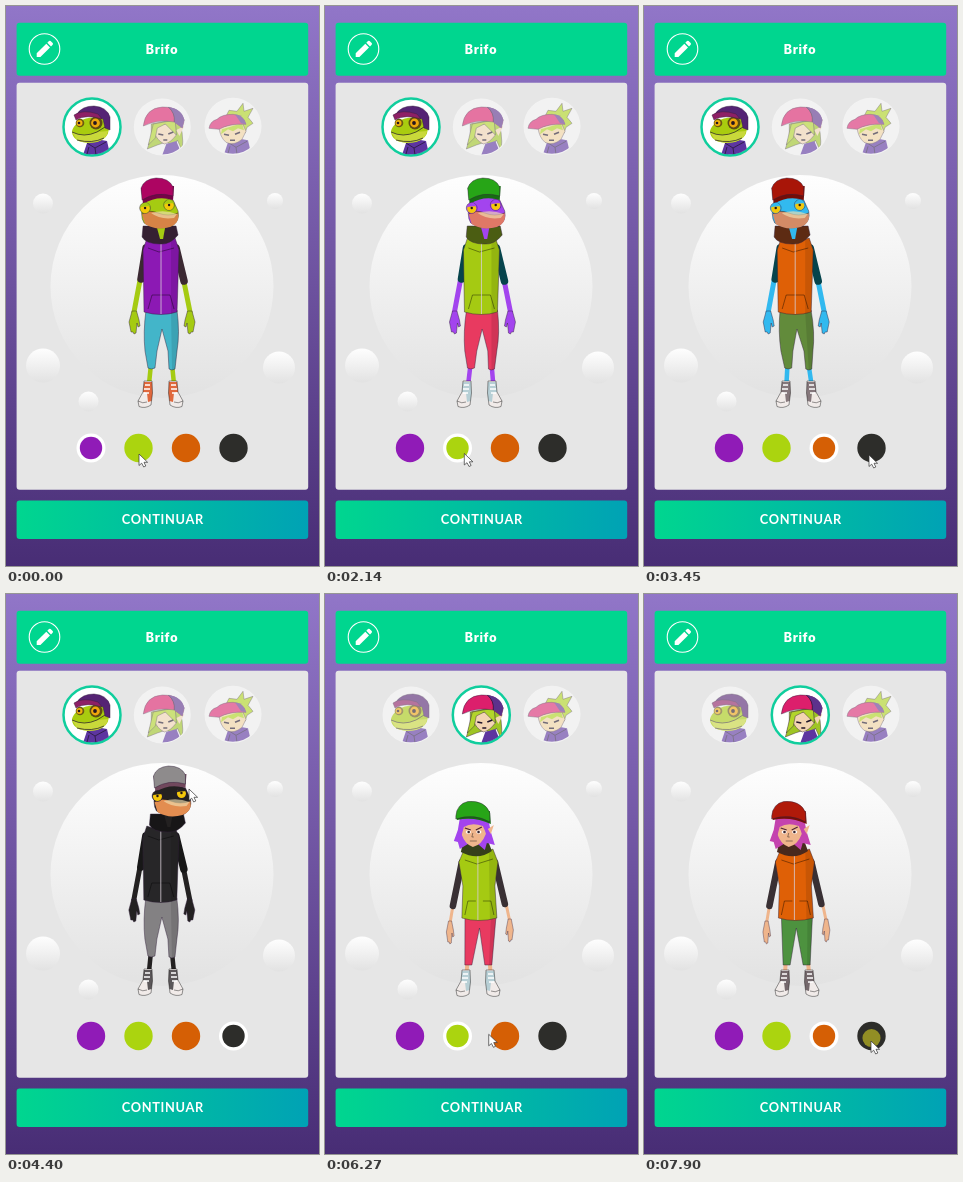
These frames come from a looping animation (313 px wide and 560 px high, 7.99 s). An HTML page:

```html
<!DOCTYPE html>
<html lang="es">
<head>
<meta charset="utf-8">
<title>Avatar</title>
<style>
html, body { margin: 0; width: 100%; height: 100%; overflow: hidden; background: #6b4d9f; }
svg { display: block; width: 100vw; height: 100vh; }
text { fill: #fff; text-anchor: middle; }
.hat { fill: var(--hat); } .band { fill: var(--band); }
.skin { fill: var(--skin); } .mouth { fill: var(--mouth); }
.vest { fill: var(--vest); } .scarf { fill: var(--scarf); }
.pants { fill: var(--pants); } .shoe { fill: var(--shoe); } .hair { fill: var(--hair); }
.sleeve, .limb { fill: none; stroke-linecap: round; stroke-linejoin: round; }
.sleeve { stroke: var(--sleeve); } .limb { stroke: var(--skin); }
.line { fill: none; stroke: #20152a; stroke-width: .7; }
.inked { stroke: #33203c; stroke-width: .6; stroke-opacity: .75; }
.seam { fill: none; stroke: #000; stroke-opacity: .5; stroke-width: .8; }
.zip { fill: none; stroke: #d8ced8; stroke-opacity: .8; stroke-width: 1; }
.shade { fill: #000; fill-opacity: .1; }
</style>
</head>
<body>
<svg viewBox="0 0 313 560" preserveAspectRatio="none">
  <defs>
    <linearGradient id="sky" x2="0" y2="1"><stop stop-color="#9176c8"/><stop offset="1" stop-color="#482d75"/></linearGradient>
    <linearGradient id="orb" x2="0" y2="1"><stop stop-color="#fefefe"/><stop offset="1" stop-color="#e2e2e2"/></linearGradient>
    <linearGradient id="cta"><stop stop-color="#00d68f"/><stop offset="1" stop-color="#00a2b5"/></linearGradient>
    <clipPath id="disc"><circle r="27.5"/></clipPath>
  </defs>
  <rect width="313" height="560" fill="url(#sky)"/>
  <rect x="10.600" y="16.700" width="291.600" height="53" rx="3" fill="#00d68f"/>
  <circle cx="38.500" cy="43" r="15.300" fill="none" stroke="#fff" stroke-width="1.100"/>
  <path d="M30.700 47.300 L40.300 37.700 L44 41.400 L34.400 51 H30.700Z M41.300 36.700 L43 35 Q43.800 34.400 44.600 35 L46.700 37.100 Q47.300 37.900 46.700 38.700 L45 40.400Z" fill="#fff"/>
  <text x="156" y="47.500" font-family="Inter, sans-serif" font-weight="800" font-size="12.500" letter-spacing=".5">Brifo</text>
  <rect x="10.600" y="76.800" width="291.600" height="407" rx="3" fill="#e6e6e6"/>
  <g id="orbs" fill="url(#orb)"></g>
  <g id="avatars"></g>
  <g id="frog"></g>
  <g id="girl"></g>
  <g id="swatches"></g>
  <rect x="10.600" y="494.600" width="291.600" height="38.300" rx="3" fill="url(#cta)"/>
  <text x="156.800" y="518" font-family="Lato, sans-serif" font-weight="700" font-size="12.800" letter-spacing=".65">CONTINUAR</text>
  <path id="cursor" d="M0 0 V11.500 L2.700 9.200 L4.700 13 L6.800 12 L5 8.300 H8.600Z" fill="#fff" stroke="#333" stroke-width=".7" stroke-linejoin="round"/>
</svg>
<script>
const LOOP = 7990;
const $ = id => document.getElementById(id);
const clamp = x => Math.max(0, Math.min(1, x));
const ease = x => x * x * (3 - 2 * x);

$('orbs').innerHTML = [[156, 280.5, 111.5], [37, 197.5, 10], [269, 195, 8], [37, 359.5, 17], [273, 361.5, 16], [82.5, 395.5, 10]]
  .map(([x, y, r]) => `<circle cx="${x}" cy="${y}" r="${r}"/>`).join('');

// Portraits
const jacket = `<path d="M-9 28 L-5 16 L4 12 L15 14 L18 27Z" fill="#5d35a0"/><path d="M-5 16 L3 21 L14 15 M3 21 L4 28 M-3 20 L-5 27" class="line"/>`;
const portraits = [
  `${jacket}<path d="M-14 -5 Q-2 -12 13 -8 L17 2 Q16 12 5 15 Q-8 17 -15 13 Q-20 10 -20 4 Q-19 0 -14 -5Z" fill="#a9cc0f"/>
   <path d="M-20 5 Q-8 11 5 5 L16 4 Q15 12 5 15 Q-8 17 -15 13Z" fill="#c9d93a"/><path d="M-20 5 Q-8 11 5 5 L13 0 M-15 13 Q0 17 12 11" class="line"/>
   <circle cx="4" cy="-4" r="6.500" fill="#5f4d12"/><circle cx="3.500" cy="-4" r="4.400" fill="#f0a60c"/><circle cx="3" cy="-4" r="1.900" fill="#251520"/>
   <circle cx="-12" cy="-4" r="4.300" fill="#6c5a12"/><circle cx="-12.500" cy="-4" r="3" fill="#f0b20c"/><circle cx="-13" cy="-4" r="1.300" fill="#251520"/>
   <path class="inked" d="M-15 -13 Q-10 -21 2 -21 Q15 -20 18 -10 L18 3 L13 1 L11 -8 Q-2 -14 -15 -9Z" fill="#552374"/>
   <path class="inked" d="M-18 -12 Q-9 -18 6 -13 L10 -8 Q-6 -13 -16 -7Z" fill="#8e1f66"/>`,
  `<path class="inked" d="M-11 -3 L15 -8 Q22 3 20 24 L15 13 L12 20 L4 15 L-5 18 L-15 22 L-11 9Z" fill="#9fc525"/>
   <path d="M0 28 L4 17 L14 14 L19 26Z" fill="#5d35a0"/>
   <path class="inked" d="M-8 -2 L13 -4 L14 8 Q8 16 2 17 Q-6 13 -8 5Z" fill="#f3d5b2"/><path d="M14 3 L22 -1 L17 9Z" fill="#f3d5b2"/>
   <path class="inked" d="M-9 -3 L-14 18 L-7 11 L-5 1 L3 -3 L14 8 L13 -7Z" fill="#b2d52b"/>
   <path d="M-4 7 L1 8 M6 7 L11 5 M1 13 H5" class="line" style="stroke-width:1.600"/>
   <path class="inked" d="M-19 -1 Q-17 -19 0 -20 Q17 -21 22 -7 L20 1 L12 -5 Q-4 -8 -19 -1Z" fill="#dc1f6c"/>
   <path d="M6 -20 Q20 -18 22 -7 L20 1 L12 -5 Q13 -14 6 -20Z" fill="#5d318c"/><path d="M12 -5 Q13 -14 6 -20" class="line"/>`,
  `${jacket}<path class="inked" d="M-8 -8 L-4 -16 L4 -15 L10 -23 L11 -15 L20 -18 L15 -9 L20 -3 L14 1 L12 7 L3 0Z" fill="#b0d51f"/>
   <path class="inked" d="M-14 1 L9 -4 L13 5 L9 13 Q1 20 -7 16 Q-13 11 -14 1Z" fill="#f3d6a2"/>
   <path d="M-11 3 L9 -3 L11 4 L5 2 L0 5 L-5 3 L-12 8Z" fill="#b0d51f"/>
   <path d="M-9 8 L-4 9 M2 8 L7 6 M-3 14 H2" class="line" style="stroke-width:1.600"/>
   <path class="inked" d="M-24 2 Q-23 -5 -16 -7 Q-11 -12 0 -12 Q11 -11 13 -2 Q-4 -3 -14 3Z" fill="#dc2874"/>
   <path d="M2 -12 Q11 -11 13 -2 L8 -3Z" fill="#663a91"/>`
];
$('avatars').innerHTML = portraits.map((p, i) =>
  `<g transform="translate(${[86, 156.3, 227][i]} ${i == 2 ? 120.3 : 121})"><circle r="28.500"/><g clip-path="url(#disc)">${p}</g></g>`).join('');
const avatars = [...$('avatars').children];

// Full figures: each layer is shifted separately
const shoe = (x, y, side) => `<g transform="translate(${x} ${y}) scale(${side} 1)">
  <path d="M-4 0 H4 L4.500 12 L3 24 Q-3 28 -9 25.500 L-10 20 L-5 11Z" fill="#f1ebe9"/>
  <path class="shoe" d="M-4 1 H4 L4.500 12 L3.500 20 L0 21 L-1 12 L-5 11Z"/>
  <path d="M-3 4 H2 M-4 8 H2 M-4 12 H1" stroke="#fff" stroke-width="1.500"/>
  <path class="seam" d="M-4 0 H4 L4.500 12 L3 24 Q-3 28 -9 25.500 L-10 20 L-5 11Z M-10 20 Q-5 23 -1 21"/></g>`;
const hand = (x, y, side) => `<path class="skin inked" transform="translate(${x} ${y}) scale(${side} 1)"
  d="M-2 -3 H2.500 L5 6 L6 12 L4 13 L3 9 L2 19 L0 20 L-1 18 L-3 18 L-4 13 L-5 8Z"/>`;
const eye = (x, y) => `<circle cx="${x}" cy="${y}" r="5.400" class="skin inked"/><circle cx="${x}" cy="${y + .5}" r="4.500" fill="#f4c70a"/>
  <circle cx="${x}" cy="${y}" r="1.200" fill="#231817"/><path class="skin" d="M${x - 5} ${y - 1} Q${x} ${y - 9} ${x + 5} ${y - 2}Z"/>`;

$('frog').innerHTML = `
  <g><path class="limb" stroke-width="4.500" d="M145 358 L143 378 M166 358 L168 378"/>
    <path class="pants inked" d="M140 304 H171 Q174 327 171 345 L169 363 Q166 365 163 363 L162 345 L156 323 L151 345 L149 362 Q145 364 142 362 L139 345 Q137 326 140 304Z"/>
    <path class="shade" d="M165 307 H171 Q174 327 171 345 L169 363 L166 364Z"/></g>
  <g>${shoe(142, 375, 1)}${shoe(167, 375, -1)}</g>
  <g><path class="limb" stroke-width="5" d="M134 274 L128 306 M178 276 L184 306"/>${hand(128, 308, 1)}${hand(184, 308, -1)}
    <path class="sleeve" stroke-width="7.500" d="M140 242 L135 273 M170 242 L178 275"/>
    <path class="vest inked" d="M141 232 Q155 238 169 232 L173 244 L171 306 Q155 311 138 306 L137 244Z"/>
    <path class="shade" d="M165 234 L169 232 L173 244 L171 306 L165 308Z"/>
    <path class="seam" d="M142 303 L146 289 H164 L168 303 M142 242 L153 246 L168 242"/>
    <path class="zip" d="M155 235 V308"/></g>
  <g><path class="scarf inked" d="M137 220 H170 L172 229 Q164 239 154 238 Q140 238 136 231Z"/>
    <path class="skin" d="M151 222 H159 L157 233 H154Z"/></g>
  <g><path class="skin inked" d="M138 194 Q152 187 167 194 L172 205 Q174 215 166 220 Q150 225 138 217 Q133 209 138 194Z"/>
    <path class="mouth" d="M136 208 Q142 203 152 207 Q162 211 172 207 Q174 217 164 221 Q150 225 139 218Z"/>
    <path class="seam" d="M136 208 Q142 203 152 207 Q162 211 172 207"/>
    <path d="M145 207 Q158 203 171 208 L168 212 Q154 214 145 207Z" fill="#f0dfb0" fill-opacity=".65"/>
    <path class="band" d="M135 182 L168 180 L167 194 Q151 189 137 198Z"/>
    <path class="hat inked" d="M135 182 Q138 173 150 172 Q163 172 167 181 L167 190 Q150 185 136 194Z"/>
    ${eye(139, 202)}${eye(163, 199)}</g>`;

$('girl').innerHTML = `
  <g><path class="limb" stroke-width="4" d="M142 360 L141 379 M163 360 L165 379"/>
    <path class="pants inked" d="M137 323 H168 L166 371 H159 L152 334 L146 371 H139Z"/>
    <path class="shade" d="M163 325 H168 L166 371 H163Z"/></g>
  <g>${shoe(141, 376, 1)}${shoe(165, 376, -1)}</g>
  <g><path class="limb" stroke-width="3" d="M125 312 L122 330 M178 309 L182 328"/>${hand(122, 330, .7)}${hand(182, 328, -.7)}
    <path class="sleeve" stroke-width="6.500" d="M134 268 L125 312 M167 268 L177 310"/>
    <path class="vest inked" d="M136 256 Q150 262 165 255 L170 268 L167 292 L169 324 Q151 329 134 324 L135 292 L131 268Z"/>
    <path class="shade" d="M161 258 L165 255 L170 268 L167 292 L169 324 L162 326Z"/>
    <path class="seam" d="M137 321 L140 307 H148 M155 307 H163 L166 321 M137 266 L149 270 L165 265"/>
    <path class="zip" d="M150 258 V326"/></g>
  <g><path class="scarf" d="M138 249 H164 L167 257 Q153 267 136 258Z"/></g>
  <g><path class="hair" d="M137 224 L165 223 L168 238 L172 251 L164 249 L162 256 L155 250 L145 250 L137 255 L135 248 L131 247 L135 236Z"/>
    <path class="skin" d="M139 229 H162 L163 240 Q159 251 150 253 Q142 250 139 241Z M165 235 L171 231 L168 240Z"/>
    <path class="hair" d="M138 226 H164 L164 241 L160 232 Q149 228 141 233 L138 244Z"/>
    <path d="M142 234 L148 236 M153 236 L159 233" stroke="#4b2435" stroke-width="1.300"/>
    <ellipse cx="145.500" cy="238" rx="2.600" ry="1.700" fill="#fff"/><ellipse cx="156" cy="238" rx="2.600" ry="1.700" fill="#fff"/>
    <circle cx="145.800" cy="238" r="1.300" fill="#38232c"/><circle cx="155.700" cy="238" r="1.300" fill="#38232c"/>
    <path class="seam" d="M150 239 L149 243 H151 M147 247 H154"/>
    <path class="band" d="M134 219 L167 217 L168 230 Q151 222 134 226Z"/>
    <path class="hat inked" d="M133 222 Q134 210 145 207.500 Q162 206 167 219 L167 228 Q151 219 133 225Z"/></g>`;

const KEYS = ['hat', 'band', 'skin', 'mouth', 'vest', 'scarf', 'sleeve', 'pants', 'shoe', 'hair'];
const FROG = [
  '#ad0562 #760447 #a5cb12 #d78346 #8c19b4 #352032 #3b2932 #43b5c9 #e0683d',
  '#27a517 #176c12 #a344ee #df7866 #a5ca12 #4b5d12 #06444c #e83a60 #b7cfd5',
  '#a81508 #730d08 #32b9ef #d38b66 #df6006 #5d2b13 #06444c #628b3b #85777b',
  '#8e8b8c #71485d #232121 #e38d50 #272628 #171617 #171717 #838183 #5b5759'
];
const GIRL = [
  '#b50758 #7a0640 #efb58c #000 #8818b0 #32232f #393034 #43afca #df6547 #df438b',
  '#27a517 #176c12 #efb58c #000 #a5ca12 #35401a #393034 #e83a60 #b7cfd5 #a344ee',
  '#b01a0a #780f08 #efb58c #000 #df6006 #49291d #393034 #4d923f #74686c #c443ae'
];

function pose(node, palette, phase, bodyShift, headShift, hip) {
  palette.split(' ').forEach((c, i) => node.style.setProperty('--' + KEYS[i], c));
  const [legs, , body, scarf, head] = node.children;
  const k = bodyShift / (390 - hip);
  const shift = (el, x) => el.setAttribute('transform', `translate(${x} 0)`);
  legs.setAttribute('transform', `matrix(1 0 ${-k} 1 ${k * 390} 0)`);
  shift(body, bodyShift);
  shift(scarf, bodyShift * .4 + headShift * .6);
  shift(head, headShift);
}

// Swatches
const COLORS = ['#901bb7', '#abd40f', '#d55f05', '#2d2d2a'];
const SPOTS = [85, 132.5, 180, 227.5];
$('swatches').innerHTML = COLORS.map((c, i) =>
  `<g transform="translate(${SPOTS[i]} 442)"><circle r="14.500" fill="#fff"/><circle fill="${c}"/><circle fill="#c3bd22"/></g>`).join('');
const swatches = [...$('swatches').children];

const SWITCH = 5080;
const CLICKS = [[1720, 1], [2700, 2], [3570, 3], [5900, 1], [6740, 2], [7770, 3]];
const PATH = [
  [0, 133, 448], [1650, 133, 448], [1850, 139.3, 447.5], [2450, 139.3, 447.5], [2680, 181, 447], [3050, 181, 448],
  [3400, 225, 449], [4080, 225, 448], [4400, 183, 195], [4700, 160, 119], [5150, 160, 119], [5620, 142.5, 436],
  [6100, 142.5, 437], [6420, 181, 443], [7180, 182, 443], [7550, 227, 447], [LOOP, 227, 447]
];

// Swatch in effect `delay` ms after each click; switching avatar resets it
function chosen(t, delay) {
  const since = t >= SWITCH ? SWITCH : 0;
  const past = CLICKS.filter(([at]) => at >= since && t >= at + delay);
  return past.length ? past[past.length - 1][1] : 0;
}

function drawSwatches(t) {
  const now = chosen(t, 270);
  swatches.forEach((g, i) => {
    const [ring, dot, ripple] = g.children;
    const on = i === now;
    ring.style.opacity = on ? 1 : 0;
    dot.setAttribute('r', on ? 11.2 : 14.2);
    const click = CLICKS.find(([at, j]) => j === i && t >= at && t < at + 270);
    const p = click ? (t - click[0]) / 270 : 0;
    ripple.setAttribute('r', 13 * Math.sqrt(p));
    ripple.setAttribute('cy', 4 * (1 - p));
    ripple.style.opacity = click ? .68 * clamp((1 - p) * 2) : 0;
  });
}

function drawAvatars(t) {
  const k = clamp((t - SWITCH + 60) / 120);
  avatars.forEach((g, i) => {
    const on = i === 0 ? 1 - k : i === 1 ? k : 0;
    const [disc, art] = g.children;
    disc.setAttribute('fill', `rgba(255,255,255,${.5 + .5 * on})`);
    disc.setAttribute('stroke', `rgba(16,206,157,${on})`);
    disc.setAttribute('stroke-width', 2.5);
    art.style.opacity = .6 + .4 * on;
  });
}

function drawCursor(t) {
  const n = PATH.findIndex(p => p[0] > t);
  const [a, b] = [PATH[n - 1], PATH[n]];
  const k = ease((t - a[0]) / (b[0] - a[0]));
  const mix = i => a[i] + (b[i] - a[i]) * k;
  $('cursor').setAttribute('transform', `translate(${mix(1)} ${mix(2)})`);
}

function draw(t) {
  const girl = t >= SWITCH;
  $('frog').style.display = girl ? 'none' : '';
  $('girl').style.display = girl ? '' : 'none';
  const look = chosen(t, 180);
  const turn = 2 * Math.PI / 1900;
  if (girl) {
    const ph = (t - 6960) * turn;
    pose($('girl'), GIRL[look % 3], ph, 3 * Math.cos(ph + .87) + 2.4, 9 * Math.cos(ph) + 3.7, 325);
  } else {
    const ph = t * turn - 1.83;
    pose($('frog'), FROG[look], ph, 3.5 * Math.cos(ph + .87) - 2, 10 * Math.cos(ph) + 2.6, 307);
  }
  drawAvatars(t);
  drawSwatches(t);
  drawCursor(t);
}

const start = performance.now();
function frame() {
  draw((performance.now() - start) % LOOP);
  requestAnimationFrame(frame);
}
frame();
</script>
</body>
</html>
```
